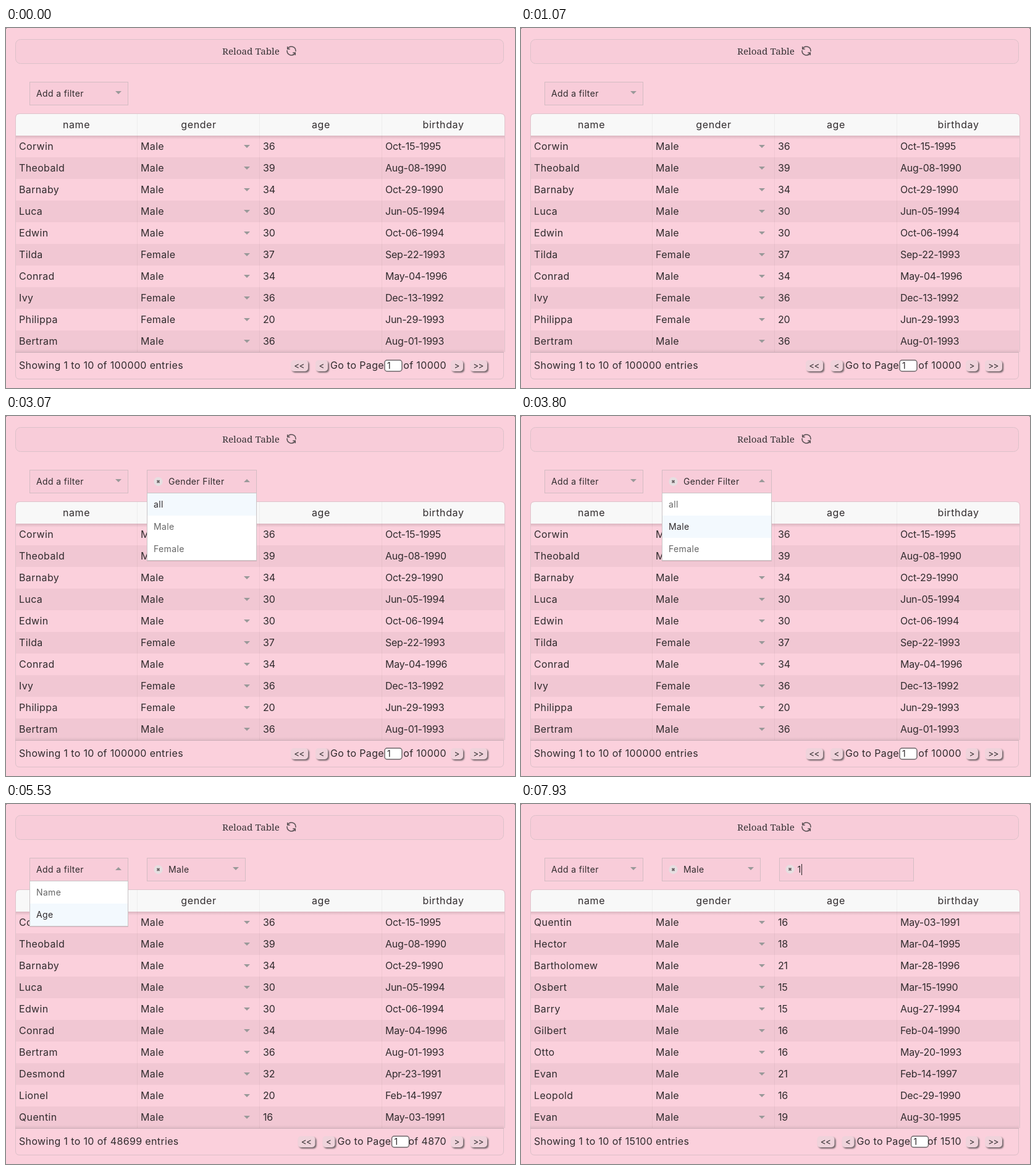
Write an HTML page that moves like this. It is 824x582 px and loops after 8 s.

```html
<!DOCTYPE html>
<html>
<head>
<meta charset="utf-8">
<style>
  html, body { margin: 0; width: 100%; height: 100%; overflow: hidden; background: #4a3f43; }
  svg { display: block; }
  text { font: 16px Inter, "Open Sans", sans-serif; fill: #302b2d; letter-spacing: .35px; white-space: pre; }
  .num { letter-spacing: -.25px; }
  .head { letter-spacing: .6px; }
  .small { font-size: 14px; }
  .sign { font-size: 13.5px; letter-spacing: -.8px; }
  .title { font: 15.2px "Noto Serif", serif; letter-spacing: 0; fill: #383336; }
  .mid { text-anchor: middle; }
  .end { text-anchor: end; }
  .dim { fill: #666; }
  .hint { fill: #b59fa6; }
</style>
</head>
<body>
<svg id="stage" width="824" height="582" viewBox="0 0 824 582"></svg>
<script>
const LOOP = 8000;
const parse = list => list.split(',').map(row => row.split(' '));
const everyone = parse('Corwin Male 36 Oct-15-1995,Theobald Male 39 Aug-08-1990,Barnaby Male 34 Oct-29-1990,' +
  'Luca Male 30 Jun-05-1994,Edwin Male 30 Oct-06-1994,Tilda Female 37 Sep-22-1993,Conrad Male 34 May-04-1996,' +
  'Ivy Female 36 Dec-13-1992,Philippa Female 20 Jun-29-1993,Bertram Male 36 Aug-01-1993');
const men = everyone.filter(p => p[1] === 'Male').concat(
  parse('Desmond Male 32 Apr-23-1991,Lionel Male 20 Feb-14-1997,Quentin Male 16 May-03-1991'));
const young = men.slice(-1).concat(
  parse('Hector Male 18 Mar-04-1995,Bartholomew Male 21 Mar-28-1996,Osbert Male 15 Mar-15-1990,' +
    'Barry Male 15 Aug-27-1994,Gilbert Male 16 Feb-04-1990,Otto Male 16 May-20-1993,' +
    'Evan Male 21 Feb-14-1997,Leopold Male 16 Dec-29-1990,Evan Male 19 Aug-30-1995'));

// value of the last [time, value] step that has begun
const at = (t, steps) => steps.reduce((v, [start, next]) => t >= start ? next : v, null);

const text = (x, y, s, cls = '') =>
  `<text x="${x}" y="${y}" class="${cls}">${s.replace(/</g, '&lt;')}</text>`;
const rect = (x, y, w, h, fill, more = '') =>
  `<rect x="${x}" y="${y}" width="${w}" height="${h}" fill="${fill}" ${more}/>`;
const arrow = (x, y, up) => `<path fill="#999" d="M${x - 5} ${up ? y + 5 : y}h10l-5 ${up ? -5 : 5}z"/>`;
const cross = (x, y) => `<circle cx="${x}" cy="${y}" r="7.2" fill="#e6dfe1"/>
  <path d="M${x - 2} ${y - 2}l4 4m0-4l-4 4" stroke="#6b6466" stroke-width="1.8"/>`;
const field = (x, w) => rect(x + .5, 87.5, w - 1, 37, '#f8ccd9', 'stroke="#d3bcc3"');

const select = (x, w, label, pad, open) => field(x, w) +
  text(x + pad, 111, label, 'small') + arrow(x + w - 16, 102, open);

function menu(x, w, items, active) {
  const h = items.length * 36;
  return rect(x + .5, 124.5, w - 1, h + 1, '#fff', 'stroke="#c9c4c6" filter="url(#soft)"') +
    items.map((s, i) => (i === active ? rect(x + 1, 125 + i * 36, w - 2, 36, '#f3f9fe') : '') +
      text(x + 11, 148 + i * 36, s, i === active ? 'small' : 'small dim')).join('');
}

const button = (x, w, s) => rect(x + 2, 539, w, 18, '#6f6468', 'rx="5" filter="url(#blur)"') +
  rect(x, 537, w, 18, '#efd3db', 'rx="5"') + text(x + w / 2 - .5, 550.5, s, 'sign mid');

const defs = `<defs>
  <linearGradient id="fade" x2="0" y2="1"><stop stop-opacity=".13"/><stop offset="1" stop-opacity="0"/></linearGradient>
  <filter id="blur"><feGaussianBlur stdDeviation=".8"/></filter>
  <filter id="soft"><feDropShadow dx="0" dy="1" stdDeviation=".7" flood-opacity=".12"/></filter>
</defs>`;

const topBar = rect(0, 0, 824, 590, '#fbd0dc', 'rx="2"') +
  rect(15.5, 18.5, 790, 39, '#f8ccd9', 'rx="8" stroke="#dcc1c9"') +
  text(350, 43, 'Reload Table', 'title') +
  `<g fill="none" stroke="#5a5155" stroke-width="1.5">
    <path d="M456 33.5A7 7 0 0 1 469 37v1M468 40.5A7 7 0 0 1 455 37v-1"/>
    <path d="M455.700 30v4h4M468.300 44v-4h-4"/></g>`;

function table(rows) {
  let s = '';
  rows.forEach(([name, gender, age, date], i) => {
    const y = 174 + i * 35;
    if (i % 2) s += rect(16, y, 791, 35, '#f1c7d3');
    s += text(21, y + 23, name) + text(218, y + 23, gender) + arrow(390, y + 15) +
      text(416, y + 23, age, 'num') + text(614, y + 23, date, 'num');
  });
  s += '<path d="M16 174V145q0-6 6-6H801q6 0 6 6V174z" fill="#f8f8f8"/>' + rect(16, 174, 791, 6, 'url(#fade)');
  ['name', 'gender', 'age', 'birthday'].forEach((h, i) => {
    s += text(114 + i * 198, 162, h, 'head mid');
    if (i) s += rect(14 + i * 198, 139, 1, 385, '#000', 'opacity=".045"');
  });
  return s + '<path d="M15.5 524V145q0-6.500 6.500-6.500H801q6.500 0 6.500 6.500V524" fill="none" stroke="#dfc3cb"/>';
}

function footer(total, pages, shift) {
  return '<path d="M15.5 524.500H805.500V561q0 6.500-6.500 6.500H22q-6.500 0-6.500-6.500z" fill="#fbd0dc" stroke="#dcbfc8"/>' +
    rect(15, 524, 791, 1, '#cdb0b9') + rect(15, 519, 791, 5, 'url(#fade)', 'transform="matrix(1 0 0 -1 0 1043)" opacity=".5"') +
    text(21, 551, `Showing 1 to 10 of ${total} entries`) +
    button(461 + shift, 28, '<<') + button(501 + shift, 20, '<') +
    text(612 + shift, 551, 'Go to Page', 'end') +
    rect(613 + shift, 537, 28, 18, '#fff', 'rx="4" stroke="#6d6669" stroke-width="1.5"') +
    text(617 + shift, 551, '1', 'small') +
    text(713, 551, 'of ' + pages, 'end') +
    button(720, 20, '>') + button(751, 28, '>>');
}

function scene(t) {
  const page = at(t, [[0, 0], [4070, 1], [7930, 2]]);
  // index of the highlighted option, null while the menu is closed
  const first = at(t, [[1330, 0], [1600, 1], [1730, 2], [1870, 1], [2330, null], [4870, 0], [5400, 1], [6200, null]]);
  const second = at(t, [[3070, 0], [3600, 1], [4000, null]]);
  const chosen = t >= 4000, typed = t >= 7870;
  const caret = t >= 7200 && t < 7670 || typed;

  let s = defs + topBar + table([everyone, men, young][page]) +
    footer(...[['100000', '10000', 0], ['48699', '4870', 11.5], ['15100', '1510', 18.5]][page]) +
    select(38, 160, 'Add a filter', 11, first !== null);
  if (first !== null) s += menu(38, 160, chosen ? ['Name', 'Age'] : ['Name', 'Gender', 'Age'], first);
  if (t >= 2330) {
    const w = chosen ? 160 : 178;
    s += select(228, w, chosen ? 'Male' : 'Gender Filter', 35, second !== null) + cross(246.5, 106);
    if (second !== null) s += menu(228, w, ['all', 'Male', 'Female'], second);
  }
  if (t >= 6200) {
    s += field(418, 218) + cross(435.5, 105.5) +
      (typed ? text(447.5, 111, '1', 'small') : text(449, 111, 'Age', 'small hint'));
    if (caret) s += rect(typed ? 454 : 449, 97, 1, 18, '#222');
  }
  return s;
}

const stage = document.getElementById('stage');
let shown;
function tick() {
  const next = scene(performance.now() % LOOP);
  if (next !== shown) stage.innerHTML = shown = next;
  requestAnimationFrame(tick);
}
tick();
</script>
</body>
</html>
```
